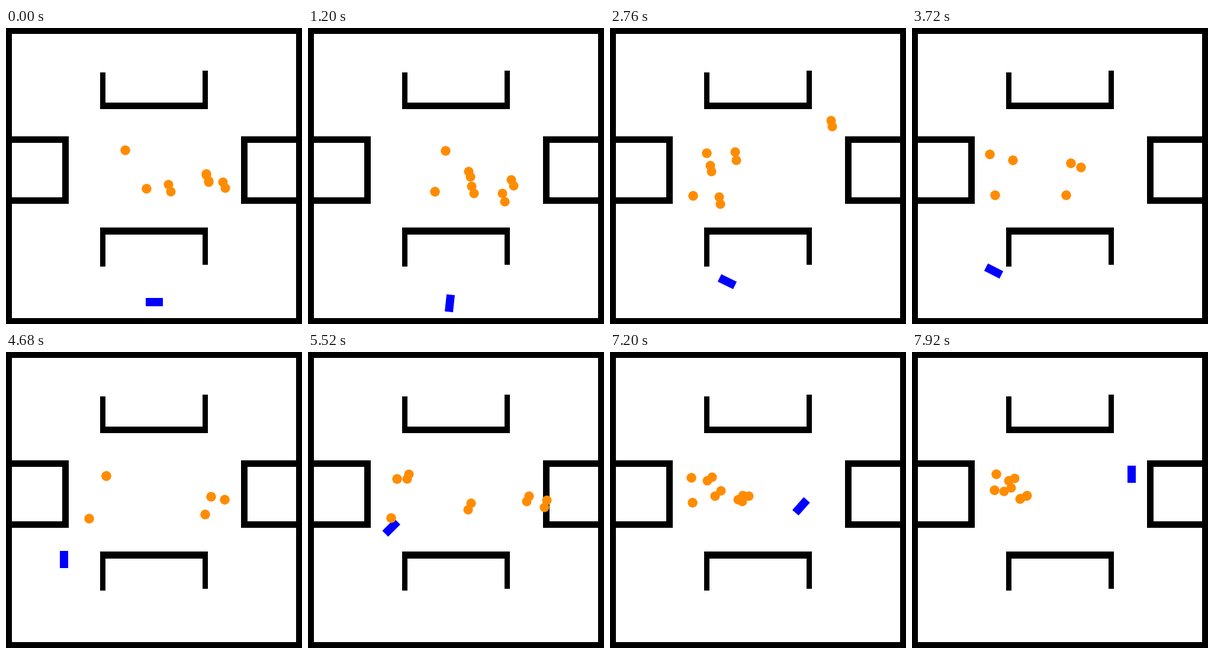
Write a matplotlib script that moves like this. It is 500 px wide and 500 px high and loops after 8000 ms.

```python
import numpy as np
import matplotlib.pyplot as plt
from matplotlib.animation import FuncAnimation
from matplotlib.patches import Circle, Polygon, Rectangle

SIZE = 500
INTERVAL = 40
FRAMES = 200
HOLD = 3  # drawn frames per simulation step
LAST = (FRAMES - 1) // HOLD

# Robot poses: step, x, y, heading in degrees (clockwise on screen)
POSES = [
    (0, 250.5, 463, 180), (10, 239.5, 465, 276), (23, 198, 428.5, 206),
    (31, 138, 410.5, 207), (39, 98, 350.5, 270), (53, 218.5, 278, 360),
    (66, 371, 206.5, 270),
]

# Distance between a walker's feet, then its turning points: step, x, y
WALKERS = [
    (11, [(0, 368, 265), (10, 345, 261), (23, 374, 161), (31, 285, 235),
          (44, 375, 248), (66, 188, 245)]),
    (13, [(0, 276, 270), (10, 278, 273), (23, 185, 291), (39, 336, 274),
          (53, 209, 247), (66, 161, 232)]),
    (0, [(0, 201, 206), (10, 232, 207), (31, 131, 213), (39, 169, 209),
         (53, 131, 220), (66, 142, 206)]),
    (0, [(0, 237, 271), (10, 214, 276), (20, 140, 283), (53, 140, 280),
         (66, 139, 233)]),
    (10, [(0, 340, 253), (23, 170, 237), (39, 169, 209), (66, 168, 215)]),
    (14, [(0, 340, 253), (10, 330, 286), (23, 212, 216), (45, 402, 256),
          (66, 188, 245)]),
]


def segment(keys, step):
    """Keys on either side of the step, and the progress between them."""
    for a, b in zip(keys, keys[1:]):
        if step <= b[0]:
            break
    return np.array(a), np.array(b), (step - a[0]) / (b[0] - a[0])


def direction(degrees):
    a = np.radians(degrees)
    return np.array([np.cos(a), np.sin(a)])


def robot_corners(step):
    a, b, u = segment(POSES, step)
    start, end = a[1:3], b[1:3]
    # Drive along a Hermite curve that leaves and arrives nose first
    reach = np.linalg.norm(end - start)
    center = (start + (end - start) * u * u * (3 - 2 * u)
              + reach * direction(a[3]) * u * (1 - u) ** 2
              - reach * direction(b[3]) * u * u * (1 - u))
    heading = a[3] + (b[3] - a[3]) * u
    along, across = 14.5 * direction(heading), 7 * direction(heading + 90)
    return center + [along + across, along - across,
                     -along - across, -along + across]


def feet(gap, path, step):
    a, b, u = segment(path, step)
    middle = a[1:] + (b - a)[1:] * (1 - np.cos(np.pi * u)) / 2
    # Feet close up around mid-loop and slowly turn from upright to flat
    spread = gap * np.clip(abs(step - 35) / 8 - 0.5, 0, 1)
    half = spread / 2 * direction(70 + 85 * (step / LAST) ** 2)
    return [np.round(middle + side * half) + 0.5 for side in (-1, 1)]


fig = plt.figure(figsize=(5, 5), dpi=100, facecolor="white")
ax = fig.add_axes([0, 0, 1, 1])
ax.set(xlim=(0, SIZE), ylim=(SIZE, 0))
ax.axis("off")


def wall(x, y, w, h):
    ax.add_patch(Rectangle((x, y), w, h, fc="black", lw=0))


for edge in (0, SIZE - 10):
    wall(edge, 0, 10, SIZE)
    wall(0, edge, SIZE, 10)
for y in (183, 286):
    wall(0, y, 106, 11)
    wall(397, y, 103, 11)
for x in (95, 397):
    wall(x, 183, 11, 114)
wall(159, 126, 182, 11)
wall(159, 337, 182, 12)
for x, top, bottom in ((159, 75, 403), (332, 72, 400)):
    wall(x, top, 9, 137 - top)
    wall(x, 337, 9, bottom - 337)

robot = ax.add_patch(Polygon(robot_corners(0), fc="#0000ff", lw=0))
dots = [ax.add_patch(Circle((0, 0), 8, fc="#ff8c00", lw=0))
        for _ in range(2 * len(WALKERS))]


def update(frame):
    step = frame // HOLD
    robot.set_xy(robot_corners(step))
    spots = [p for gap, path in WALKERS for p in feet(gap, path, step)]
    for dot, spot in zip(dots, spots):
        dot.center = spot
    return [robot, *dots]


anim = FuncAnimation(fig, update, frames=FRAMES, interval=INTERVAL,
                     repeat=True, repeat_delay=0)
plt.show()
```
